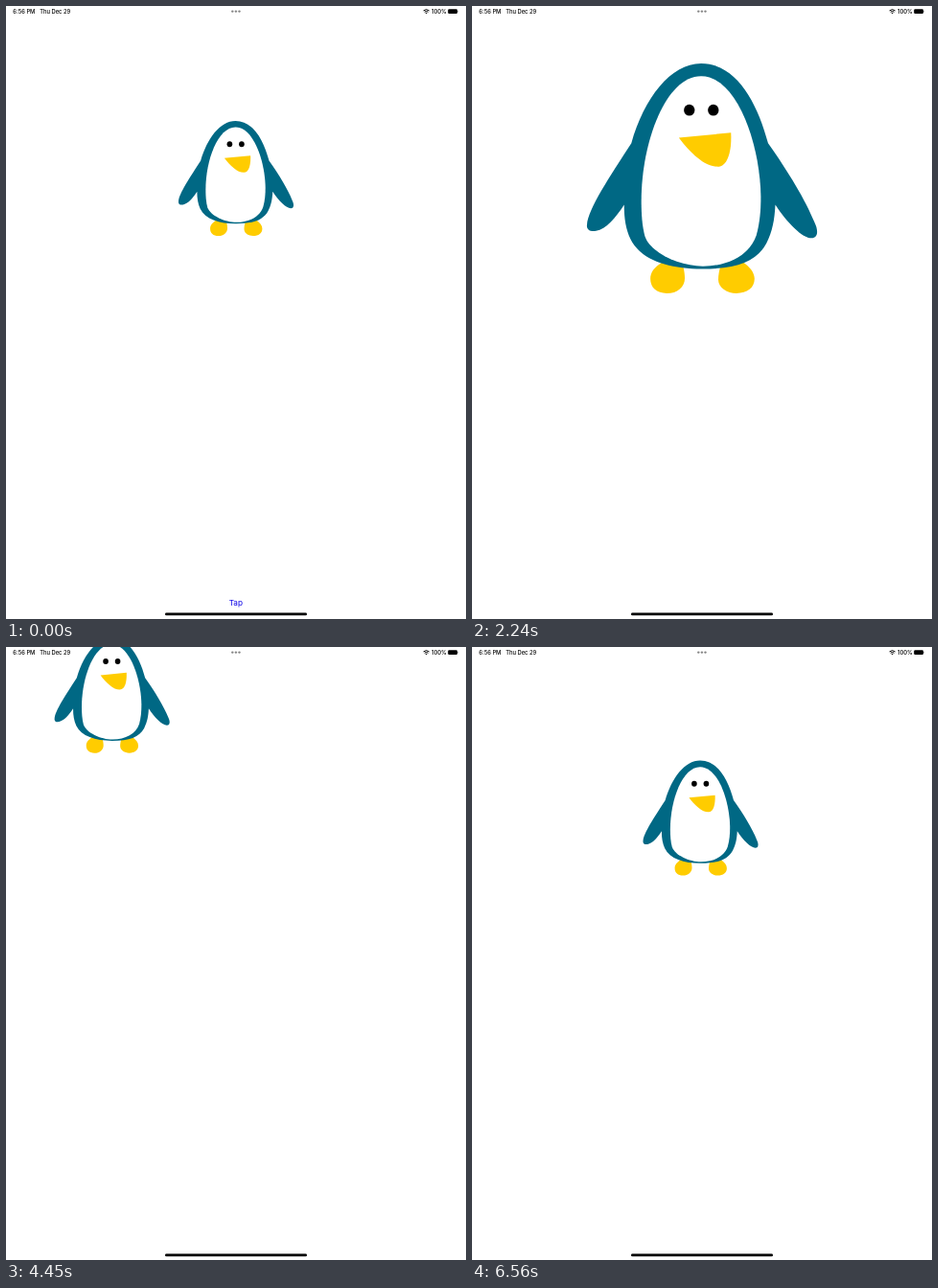
Animation, 480 px wide and 640 px high, one loop 8 s. Source, as an HTML page:

```html
<!DOCTYPE html>
<html lang="en">
<head>
<meta charset="utf-8">
<title>Spring penguin</title>
<style>
  html, body { margin: 0; width: 100%; height: 100%; overflow: hidden; background: #fff; }
  svg { display: block; width: 480px; height: 640px; }
  text { font-family: Inter, sans-serif; }
  .status { font-size: 5.8px; font-weight: 500; }
  .tap { font-size: 8.2px; fill: #0a00e6; text-anchor: middle; }
  .blue { fill: #006884; }
  .yellow { fill: #fc0; }
  .white { fill: #fff; }
</style>
</head>
<body>
<svg viewBox="0 0 480 640">
  <g id="penguin">
    <g transform="scale(.4724) translate(-240 -180)">
      <path class="yellow" d="M197 272C187 278 183 284 183 291C183 301 190 307 201 307C213 307 221 300 221 290C221 285 220 280 218 272Z
        M262 272C259 280 258 287 258 292C258 301 268 307 278 307C290 307 298 301 298 291C298 284 293 278 285 272Z"/>
      <path class="blue" d="M239 53C205 53 176 92 162 141C138 178 114 214 113 231C112 238 118 239 123 238C134 236 145 223 154 209
        C154 225 156 236 161 247C172 270 203 280 240 280C279 280 300 272 311 252C318 238 320 226 321 209
        C334 229 351 246 361 246C368 246 369 238 364 228C355 205 335 172 313 141C301 96 278 53 239 53Z"/>
      <path class="white" d="M239 67C200 67 173 140 173 205C173 220 174 234 177 244C183 262 215 277 241 277
        C270 277 293 264 300 243C304 228 305 215 305 200C304 140 278 67 239 67Z"/>
      <ellipse cx="226" cy="104.5" rx="6" ry="6.3"/>
      <ellipse cx="252.5" cy="104.5" rx="6" ry="6.3"/>
      <path class="yellow" d="M214.5 135L272 129.5C273 148 269 167 257 167C243 167 227 152 214.5 135Z"/>
    </g>
  </g>

  <text class="status" x="7.3" y="7.7">6:56 PM</text>
  <text class="status" x="35.2" y="7.7">Thu Dec 29</text>
  <text class="status" x="444" y="7.7">100%</text>
  <g fill="#858585">
    <circle cx="236.3" cy="5.6" r="1.2"/>
    <circle cx="239.9" cy="5.6" r="1.2"/>
    <circle cx="243.5" cy="5.6" r="1.2"/>
  </g>
  <g fill="none" stroke="#000" stroke-width="1">
    <path d="M435.6 4.9Q438.6 2.3 441.6 4.9M436.7 6.2Q438.6 4.6 440.5 6.2"/>
  </g>
  <path d="M437.5 7.1Q438.6 6.2 439.7 7.1L438.6 8.2Z"/>
  <rect x="461.2" y="3.3" width="9.8" height="4.7" rx="1.3"/>
  <rect x="471.4" y="4.8" width=".7" height="1.7" rx=".3" fill="#777"/>

  <text class="tap" id="tap" x="239.8" y="625.8">Tap</text>
  <rect x="166" y="633.6" width="148" height="2.7" rx="1.35"/>
</svg>
<script>
  const LOOP = 8000;
  const REST = { scale: 1, shift: 0 };
  const BIG = { scale: 2, shift: 0 };
  const CORNER = { scale: 1, shift: -120 };

  const every110 = t => Array.from({ length: 10 }, (_, i) => t + 110 * i);

  // The picture refreshes only at the ticks; the spring starts at `start`.
  const moves = [
    { start: 477, from: REST, to: BIG, ticks: [500, 610, 720, 830, 940, 1150, 1340, 1450] },
    { start: 2250, from: BIG, to: REST, ticks: every110(2240) },
    { start: 3945, from: REST, to: CORNER, ticks: [3920, 4020, 4130, 4240, 4340, 4450, 4560, 4660, 4770, 4880] },
    { start: 5640, from: CORNER, to: REST, ticks: [5600, 5710, 5820, 5920, 6030, 6130, 6240, 6340, 6450, 6560] }
  ];

  const penguin = document.getElementById('penguin');
  const tap = document.getElementById('tap');

  // Underdamped spring: damping ratio 0.5, initial velocity 5, settling in 1 s.
  function spring(ms) {
    const t = Math.max(0, ms) / 1000;
    const decay = 4.39, freq = decay * Math.sqrt(3), velocity = 5;
    return 1 - Math.exp(-decay * t) *
      (Math.cos(freq * t) + (decay - velocity) / freq * Math.sin(freq * t));
  }

  const mix = (a, b, p) => a + (b - a) * p;

  function pose(time) {
    const move = moves.filter(m => time >= m.ticks[0]).pop();
    if (!move) return REST;
    const tick = move.ticks.filter(t => t <= time).pop();
    const p = spring(tick - move.start);
    return {
      scale: mix(move.from.scale, move.to.scale, p),
      shift: mix(move.from.shift, move.to.shift, p)
    };
  }

  const origin = performance.now();

  function draw() {
    const time = (performance.now() - origin) % LOOP;
    const { scale, shift } = pose(time);
    penguin.setAttribute('transform', `translate(${240 + shift} ${180 + shift}) scale(${scale})`);
    tap.style.visibility = time < moves[0].ticks[0] ? 'visible' : 'hidden';
    requestAnimationFrame(draw);
  }
  draw();
</script>
</body>
</html>
```
